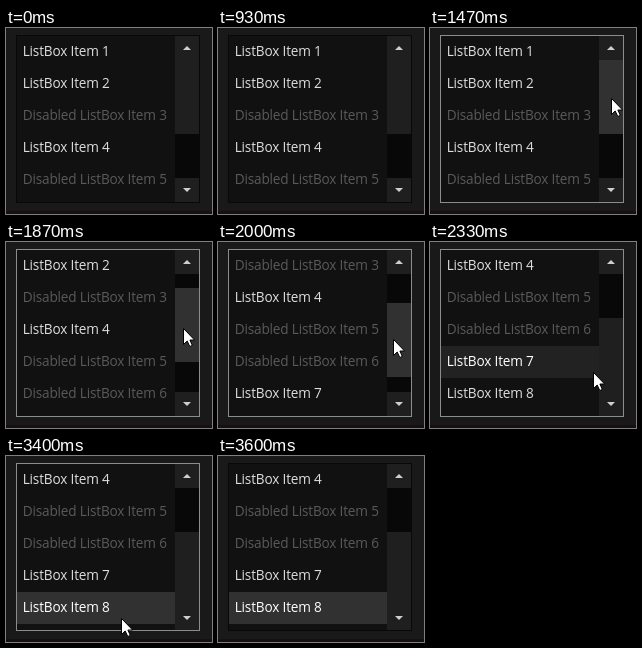
These frames come from a looping animation (206 by 186 pixels, 4.79 s). An HTML page:

```html
<!DOCTYPE html>
<html lang="en">
<head>
<meta charset="utf-8">
<title>ListBox</title>
<style>
  html, body { margin: 0; width: 100%; height: 100%; overflow: hidden; background: #191919; }
  svg { display: block; width: 100vw; height: 100vh; }
  text { font: 13.6px "Open Sans", "Noto Sans", sans-serif; letter-spacing: -.17px; }
</style>
</head>
<body>
<svg id="stage" viewBox="0 0 206 186">
  <rect width="206" height="186" fill="#191919"/>
  <rect y="183" width="206" height="3" fill="#180f13"/>
  <rect id="frame" x="10.5" y="7.5" width="183" height="167" fill="#111"/>
  <g id="rows"></g>
  <rect x="169" y="8" width="24" height="166" fill="#080808"/>
  <rect x="169" y="8" width="24" height="24" fill="#1f1f1f"/>
  <rect x="169" y="150" width="24" height="24" fill="#1f1f1f"/>
  <path d="M177 22l4-4 4 4zM177 160h8l-4 4z" fill="#cfcfcf"/>
  <rect id="thumb" x="169" width="24" height="74"/>
  <path id="cursor" d="M.5 .5V16.5L4.2 13 6.8 18.5 9.3 17.4 6.9 12H11.6Z" fill="#fff" stroke="#000"/>
</svg>
<script>
const LOOP = 4790, TICK = 1000 / 15;
const ROW = 32, TOP = 8, VISIBLE = 5, TOTAL = 8;
const THUMB_TOP = 32, THUMB_SIZE = 74, THUMB_STEP = 118 / TOTAL;
const DISABLED = [3, 5, 6];
const SELECT = 2730;

const linear = u => u;
const easeIn = u => u ** 1.9;
const easeOut = u => 1 - (1 - u) ** 2;

// Pointer strokes, each starting where the one before ended
const START = { x: 190, y: 190 };
const ENTER = { from: 930, to: 1400, x: 181, y: 70, easeX: easeOut, easeY: easeOut };
const DRAG = { from: 1470, to: 2200, x: 170, y: 119, easeX: easeIn, easeY: easeIn };
const PICK = { from: 2200, to: 2600, x: 114, y: 152, easeX: easeIn, easeY: linear };
const EXIT = { from: 3333, to: 3600, x: 118, y: 190, easeX: linear, easeY: linear };
const STROKES = [ENTER, DRAG, PICK, EXIT];

const byId = id => document.getElementById(id);
const set = (el, attrs) => { for (const k in attrs) el.setAttribute(k, attrs[k]); };
const clamp = (v, lo, hi) => Math.min(hi, Math.max(lo, v));
const frame = byId("frame"), thumb = byId("thumb"), cursor = byId("cursor");

function add(tag, attrs) {
  const el = document.createElementNS("http://www.w3.org/2000/svg", tag);
  set(el, attrs);
  return byId("rows").appendChild(el);
}

const rows = Array.from({ length: VISIBLE }, (_, i) => ({
  back: add("rect", { x: 11, y: TOP + i * ROW, width: 158, height: ROW }),
  label: add("text", { x: 16.7, y: TOP + 20 + i * ROW })
}));

function pointerAt(t) {
  let { x, y } = START;
  for (const s of STROKES) {
    const u = clamp((t - s.from) / (s.to - s.from), 0, 1);
    x += (s.x - x) * s.easeX(u);
    y += (s.y - y) * s.easeY(u);
  }
  return [Math.round(x), Math.round(y)];
}

function draw(ms) {
  // The picture advances in steps of a fifteenth of a second
  const t = Math.floor((ms + 4) / TICK) * TICK + 4;
  const [x, y] = pointerAt(t);
  const shown = t >= ENTER.from && t < EXIT.to;
  const inside = shown && y < 175;
  const dragged = t < DRAG.from ? 0 : Math.round((y - ENTER.y) / THUMB_STEP);
  const scroll = clamp(dragged, 0, TOTAL - VISIBLE);
  const thumbY = Math.floor(THUMB_TOP + scroll * THUMB_STEP);
  const onThumb = inside && x >= 169 && y >= thumbY && y < thumbY + THUMB_SIZE;
  const hovered = inside && x < 169 ? Math.floor((y - TOP) / ROW) : -1;

  set(frame, { stroke: inside ? "#8c8c8c" : "#080808" });
  set(thumb, { y: thumbY, fill: onThumb ? "#313131" : "#1f1f1f" });
  set(cursor, { transform: `translate(${x} ${y})`, visibility: shown ? "visible" : "hidden" });

  rows.forEach(({ back, label }, i) => {
    const n = i + 1 + scroll, off = DISABLED.includes(n);
    const selected = n === TOTAL && t >= SELECT;
    const lit = !off && i === hovered;
    set(back, { fill: selected ? "#313131" : lit ? "#222" : "#111" });
    set(label, { fill: off ? "#5a5a5a" : selected || lit ? "#fff" : "#dedede" });
    label.textContent = `${off ? "Disabled " : ""}ListBox Item ${n}`;
  });
}

const start = performance.now();
function loop() {
  draw((performance.now() - start) % LOOP);
  requestAnimationFrame(loop);
}
loop();
</script>
</body>
</html>
```
